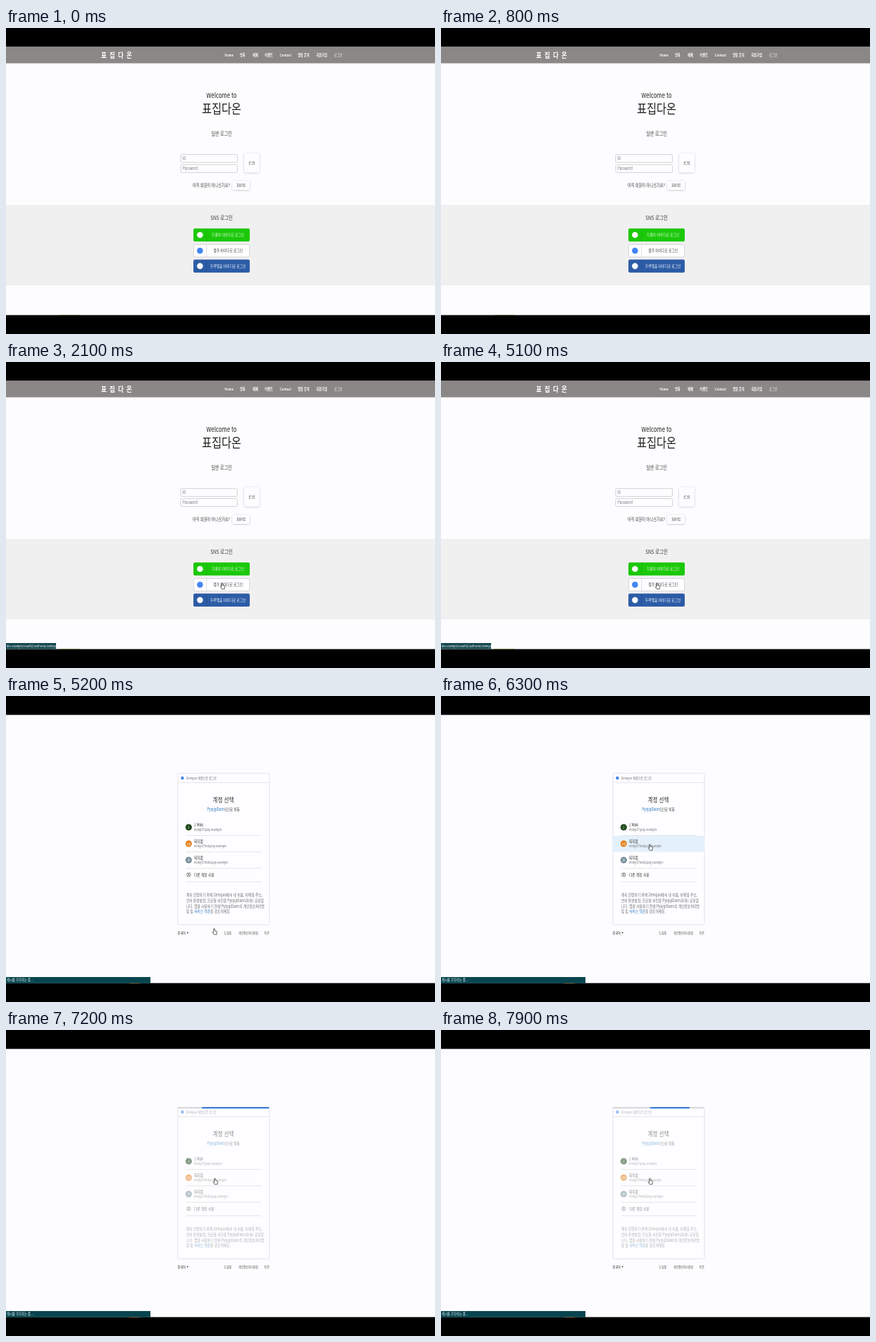
An HTML page that plays this animation: 600x429 px, repeating every 8 s.

```html
<!DOCTYPE html>
<html lang="ko">
<head>
<meta charset="utf-8">
<style>
html, body { margin: 0; width: 100%; height: 100%; overflow: hidden; background: #000; }
svg { display: block; width: 100%; height: 100%; }
text { font-family: "Noto Sans CJK KR", "Noto Sans CJK", "Noto Sans", sans-serif; white-space: pre; }
</style>
</head>
<body>
<svg id="stage" viewBox="0 0 600 429" preserveAspectRatio="none"></svg>
<script>
const LOOP = 8000, STEP = 100, NARROW = 0.8;
const INK = '#333', GREY = '#6b6b70', BLUE = '#2676c0';

const text = (x, y, size, str, fill = INK, weight = 400, anchor = 'start', extra = '') =>
  `<text transform="translate(${x} ${y}) scale(${NARROW} 1)" font-size="${size}" fill="${fill}" ` +
  `font-weight="${weight}" text-anchor="${anchor}" ${extra}>${str}</text>`;
const mid = (x, y, size, str, fill, weight) => text(x, y, size, str, fill, weight, 'middle');
const rect = (x, y, w, h, fill, extra = '') =>
  `<rect x="${x}" y="${y}" width="${w}" height="${h}" fill="${fill}" ${extra}/>`;
const dot = (x, y, r, fill, extra = '') =>
  `<circle cx="${x}" cy="${y}" r="${r}" fill="${fill}" ${extra}/>`;
const rule = (x, y, w) => rect(x, y, w, 0.7, '#dfdde2');
const blue = str => `<tspan fill="${BLUE}">${str}</tspan>`;
const frame = 'rx="1" stroke="#c9c7cb" stroke-width=".8"';

const SITE = '표집다온', SITE_EN = 'PyojipDaon', PORTAL = 'Zemquo';

const raised = (x, y, w, h, label) =>
  rect(x, y, w, h, '#fdfcfe', 'rx="2" filter="url(#soft)"') +
  mid(x + w / 2, y + h / 2 + 1.5, 4.2, label, '#222', 500);

const social = (y, h, fill, icon, line, ink, label, weight, edge = fill) =>
  rect(262.5, y, 78, h, fill, `rx="1.5" stroke="${edge}" stroke-width=".8"`) +
  rect(280, y, 0.7, h, line) + dot(271.3, y + h / 2, 4.2, icon) +
  mid(310.5, y + h / 2 + 2.1, 5.8, label, ink, weight);

const nav = [[306, 'Home'], [327, '영화'], [345, '예매'], [362, '이벤트'],
  [383, 'Contact'], [408, '챗봇 문의'], [434, '회원가입'], [459, '로그인']];

const login =
  rect(0, 26.5, 600, 23, '#8b8787') +
  text(133, 41.7, 10.5, [...SITE].join(' '), '#fff', 700, 'start', 'letter-spacing="1.1"') +
  nav.map(([x, s]) => text(x, 40, 5.2, s, '#fff', x < 450 ? 700 : 500)).join('') +
  mid(301.5, 97.7, 9.6, 'Welcome to', '#222', 500) +
  mid(301.5, 120.3, 18.7, SITE, '#222', 400) +
  mid(301.5, 151, 7.5, '일반 로그인', '#444') +
  rect(244.5, 177.4, 79, 11, '#fefdff', frame) + text(247, 185.2, 5.8, 'ID', '#77757a') +
  rect(244.5, 191.6, 79, 11, '#fefdff', frame) + text(247, 199.3, 5.8, 'Password', '#77757a') +
  raised(333, 175.5, 21.5, 27, '로그인') +
  text(261, 222.6, 6.4, '아직 회원이 아니신가요?', '#444') +
  raised(316.5, 214.5, 24.5, 12.5, '회원가입') +
  rect(0, 248, 600, 113, '#f1f0f1') +
  mid(301.5, 269.2, 7.8, 'SNS 로그인') +
  social(281.4, 17.5, '#1bc80a', '#fff', '#17b008', '#e4ffdf', '다롱이 아이디로 로그인', 400) +
  social(303.5, 17.5, '#fefdff', '#4285f4', '#d5d3d7', '#444', '젬쿠 아이디로 로그인', 400, '#cfcdd1') +
  social(325, 17.5, '#2c5ca6', '#fff', '#244e90', '#fff', '두루엮음 아이디로 로그인', 500) +
  rect(75, 402.4, 28, 0.7, '#55521c');

const account = (y, fill, initials, name, mail, weight) =>
  dot(255.5, y, 4.5, fill) + mid(255.5, y + 1.7, 4.5, initials, '#fff') +
  text(263, y - 1, 5.8, name, INK, weight) + text(263, y + 5, 4.8, mail, GREY);

const terms = [
  `계속 진행하기 위해 ${PORTAL}에서 내 이름, 이메일 주소,`,
  `언어 환경설정, 프로필 사진을 ${SITE_EN}과(와) 공유합`,
  `니다. 앱을 사용하기 전에 ${SITE_EN}의 개인정보처리방`,
  `침 및 ${blue('서비스 약관')}을 검토하세요.`];

const chooser =
  rect(240.3, 108.3, 128, 212.5, '#fefdff', 'rx="2" stroke="#e0dee3" stroke-width=".8"') +
  rule(240.5, 121, 127.5) +
  [195, 241, 260].map(y => rule(252, y, 105)).join('') +
  '<g id="rowRule">' + rule(252, 218, 105) + '</g>' +
  '<g id="rowLight">' + rect(240, 196, 128.7, 22.5, '#e4f1fb') + '</g>' +
  '<g id="content">' +
  dot(246.7, 115, 2.2, '#4285f4') +
  text(252, 117, 4.9, `${PORTAL} 계정으로 로그인`, GREY) +
  mid(304, 149.3, 9.3, '계정 선택') +
  mid(304, 161, 5.7, `${blue(SITE_EN)}(으)로 이동`) +
  account(184, '#234a20', 'J', 'J Mok', 'mokjr27@zq.example', 500) +
  account(207, '#e2790f', '지람', '목지람', 'mokjr27test@zq.example') +
  account(230, '#78909c', 'JR', '목지람', 'mokjr27test2@zq.example') +
  dot(255.5, 250.5, 2.7, 'none', 'stroke="#555" stroke-width=".7"') +
  dot(255.5, 249.7, 0.9, '#555') +
  '<path d="M253.9 252.3q1.6-1.6 3.2 0" fill="none" stroke="#555" stroke-width=".7"/>' +
  text(263, 252.6, 5.8, '다른 계정 사용') +
  terms.map((s, i) => text(252, 281 + 7.8 * i, 5.8, s, GREY)).join('') +
  '</g>' +
  '<g id="progress">' + rect(240, 108, 128, 2.1, '#d9dade') +
  rect(240, 108, 0, 2.1, '#3a7bd5', 'class="run"') +
  rect(240, 108, 0, 2.1, '#3a7bd5', 'class="run"') + '</g>' +
  text(240, 334, 5, '한국어', '#222', 500) +
  '<path d="M252.6 331.2h2.6l-1.3 1.7z" fill="#222"/>' +
  [[305, '도움말'], [325, '개인정보처리방침'], [361, '약관']]
    .map(([x, s]) => text(x, 334, 4.7, s, '#555')).join('') +
  rect(0, 394, 202, 8.8, '#07454f') +
  text(1, 400.3, 5.3, '캐시를 기다리는 중...', '#fff') +
  rect(172, 402.7, 15, 0.7, '#8a5a20');

const hand = 'M-1.6-3.6q.9-1.2 1.6 0v2.6l2.5.7q.8.4.6 1.4l-.7 3.2h-3.5l-2.1-3q.1-1 1.6-.1z';

const stage = document.getElementById('stage');
stage.innerHTML =
  '<defs><filter id="soft" x="-30%" y="-30%" width="160%" height="160%">' +
  '<feDropShadow dx="0" dy=".5" stdDeviation="1" flood-opacity=".28"/></filter></defs>' +
  rect(0, 0, 600, 429, '#000') + rect(0, 26.5, 600, 376, '#fdfcfe') +
  `<g id="login">${login}</g><g id="chooser">${chooser}</g>` +
  '<g id="link">' + rect(0, 394, 70, 8.3, '#12464f') +
  text(1, 400, 4.8, '', '#fff', 400, 'start', 'id="url"') + '</g>' +
  `<path id="cursor" d="${hand}" fill="#fff" stroke="#222" stroke-width=".7"/>`;

const $ = id => document.getElementById(id);
const show = (id, on) => { $(id).style.display = on ? '' : 'none'; };
const ramp = (t, start, len) => Math.min(1, Math.max(0, (t - start) / len));

// Pointer stops: time, x, y
const stops = [[1000, 598, 300], [1400, 430, 262], [1800, 320, 291], [1900, 318, 292],
  [2100, 303, 314], [5199, 303, 314], [5200, 292, 330], [5700, 292, 330], [5900, 293, 212]];

function pointer(t) {
  const next = stops.findIndex(s => s[0] > t);
  if (next < 0) return stops[stops.length - 1].slice(1);
  if (next === 0) return stops[0].slice(1);
  const a = stops[next - 1], b = stops[next], u = ramp(t, a[0], b[0] - a[0]);
  return [a[1] + (b[1] - a[1]) * u, a[2] + (b[2] - a[2]) * u];
}

function draw(now) {
  const t = Math.floor(now % LOOP / STEP) * STEP;
  const picking = t >= 5200, busy = t >= 6400;
  show('login', !picking);
  show('chooser', picking);
  show('link', t >= 1800 && !picking);
  $('url').textContent = 'dev.example/oauth2/authorize/' + (t < 2000 ? 'darong' : 'zemquo');

  show('rowLight', t === 6300);
  show('rowRule', t !== 6300);
  $('content').setAttribute('opacity', 1 - 0.47 * ramp(t, 6300, 300));

  show('progress', busy);
  const runs = [
    [ramp(t, 6840, 700) ** 2, ramp(t, 6400, 650)],
    [ramp(t, 7600, 730), ramp(t, 7450, 535)]];
  document.querySelectorAll('.run').forEach((bar, i) => {
    const [tail, head] = runs[i];
    bar.setAttribute('x', 240 + 128 * tail);
    bar.setAttribute('width', 128 * Math.max(0, head - tail));
  });

  show('cursor', t >= 1000);
  $('cursor').setAttribute('transform', `translate(${pointer(t)})`);
}

const start = performance.now();
(function tick() {
  draw(performance.now() - start);
  requestAnimationFrame(tick);
})();
</script>
</body>
</html>
```
